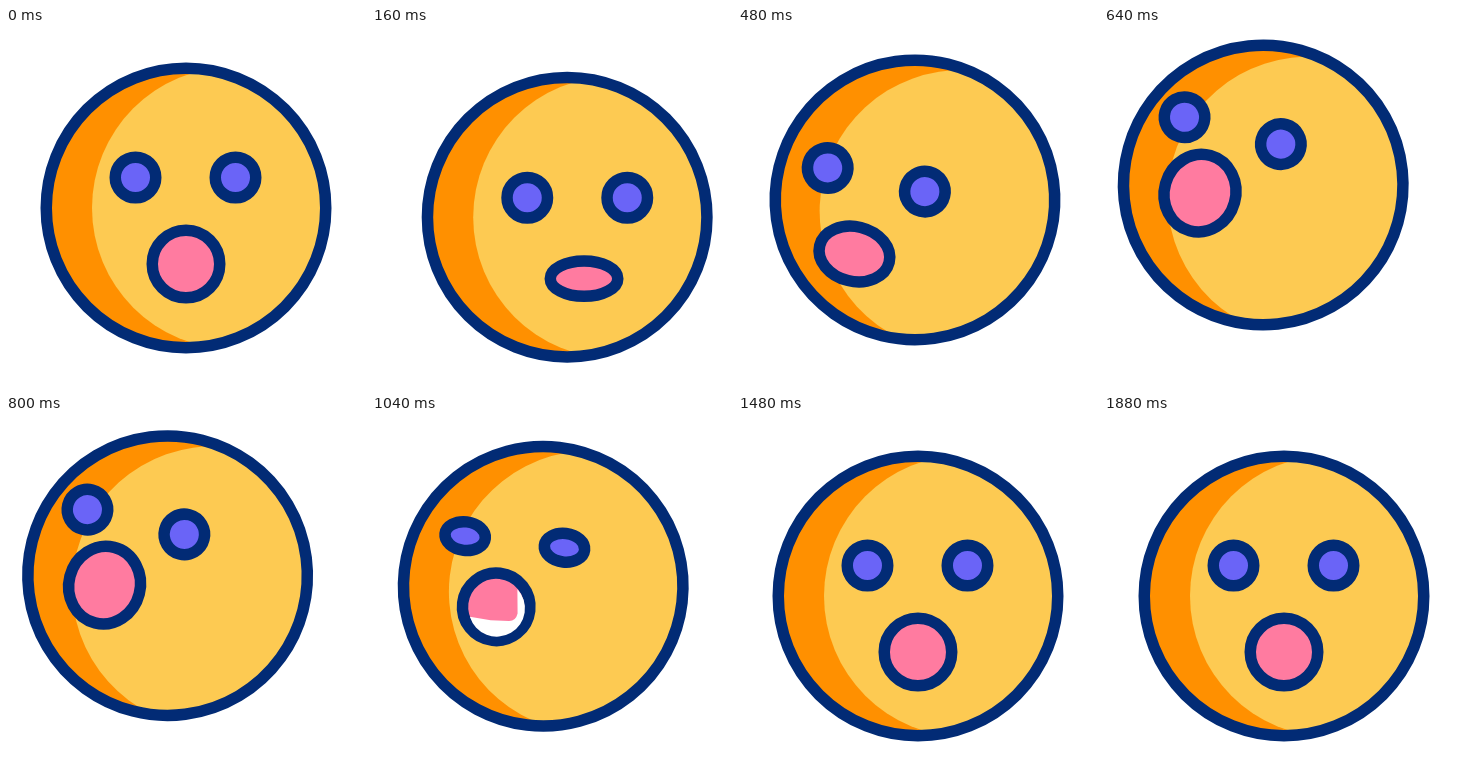
Recreate the animation shown at these times as an HTML page. Size 360x360 px, loop 2000 ms.

```html
<!DOCTYPE html>
<html lang="en">
<head>
<meta charset="utf-8">
<title>Surprised face</title>
<style>
  html, body { margin: 0; width: 100%; height: 100%; overflow: hidden; background: #fff; }
  svg { display: block; width: 100vw; height: 100vh; }
  .line { stroke: #022b75; stroke-width: 11.5; }
</style>
</head>
<body>
<svg viewBox="0 0 360 360">
  <clipPath id="disc"><circle r="139.75"/></clipPath>
  <g id="face">
    <circle r="139.75" fill="#ff9000"/>
    <circle cx="47" r="141" fill="#fdca52" clip-path="url(#disc)"/>
    <circle class="line" r="139.75" fill="none"/>
    <g id="eyes" fill="#6a64f7">
      <ellipse class="line" cx="-50.5" cy="-30.5" rx="20.25"/>
      <ellipse class="line" cx="49.5" cy="-30.5" rx="20.25"/>
    </g>
    <g id="mouth">
      <ellipse id="lips" class="line" fill="#ff7ba0"/>
      <path id="glint" fill="#fff" d="M19-20L22 4Q21 12 14 12.5L-4 14-25 13A28.2 28.2 0 1 0 19-20Z"/>
    </g>
  </g>
</svg>
<script>
const LOOP = 2000, EYE = 20.25, MOUTH = 33.75;

const clamp = u => Math.min(1, Math.max(0, u));

// Sine ease from 0 to 1 between two times.
const ramp = (t, start, end) => (1 - Math.cos(Math.PI * clamp((t - start) / (end - start)))) / 2;

// Offset from rest: dip to `low` by `turn`, reach `high` by `peak`, return between `leave` and `home`.
const swing = (t, low, high, turn, peak, leave, home) =>
  low * ramp(t, 0, turn) + (high - low) * ramp(t, turn, peak) - high * ramp(t, leave, home);

// Eye openness: closes and opens steadily around each blink.
const blink = t => Math.max(0.05, Math.min(1, Math.abs(t - 1140) / 140, Math.abs(t - 1740) / 140));

const get = id => document.getElementById(id);
const set = (el, name, value) => el.setAttribute(name, value);
const face = get("face"), eyes = get("eyes"), mouth = get("mouth"), lips = get("lips"), glint = get("glint");

function place(el, x, y, angle = 0) {
  set(el, "transform", `translate(${x} ${y}) rotate(${angle})`);
}

function draw(t) {
  place(face,
    180 + swing(t, 23.4, -20.8, 270, 645, 640, 1370),
    180 + swing(t, 14.2, -23, 270, 645, 640, 1370),
    swing(t, 0, 15.6, 180, 570, 680, 1340));

  place(eyes,
    swing(t, 14, -43.5, 240, 510, 820, 1490),
    swing(t, 31.6, -13.6, 400, 640, 820, 1490));
  for (const eye of eyes.children) set(eye, "ry", EYE * blink(t));

  place(mouth,
    swing(t, 22.3, -58.7, 240, 565, 820, 1490),
    56 + swing(t, 17.6, -31.2, 430, 640, 980, 1490));
  set(lips, "rx", MOUTH + swing(t, 0, 2, 320, 480, 800, 1040));
  set(lips, "ry", MOUTH + swing(t, -33.4, 5.25, 330, 570, 800, 1040));
  set(glint, "visibility", t >= 1040 && t < 1080 ? "visible" : "hidden");
}

const start = performance.now();
function tick() {
  draw((performance.now() - start) % LOOP);
  requestAnimationFrame(tick);
}
tick();
</script>
</body>
</html>
```
